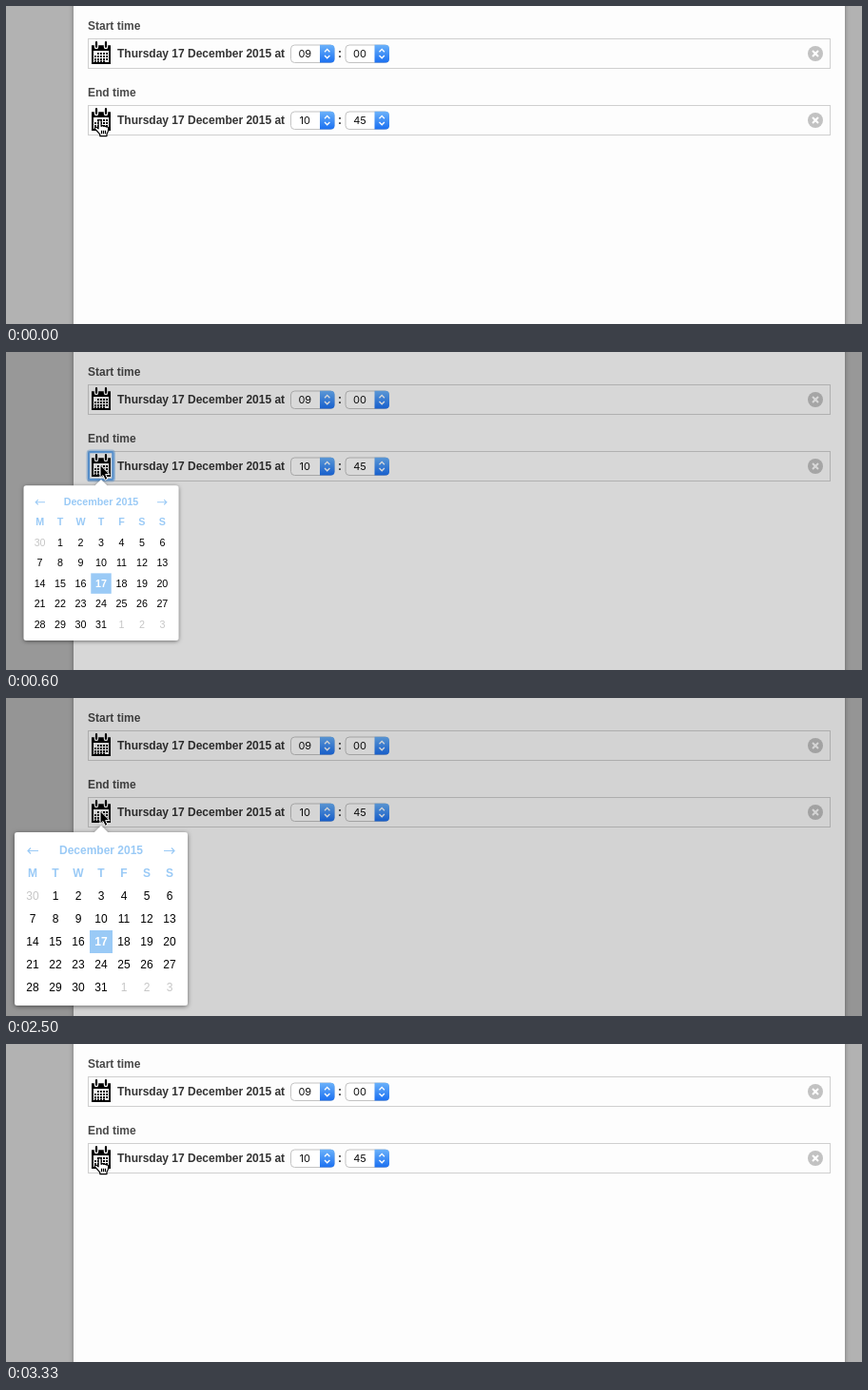
An HTML page for the animation above (4.01 s loop, 900 px wide and 334 px high).

```html
<!DOCTYPE html>
<html lang="en">
<head>
<meta charset="utf-8">
<title>Date picker</title>
<style>
  html, body { margin: 0; width: 100%; height: 100%; overflow: hidden; background: #b2b2b2; }
  svg { display: block; width: 900px; height: 334px; }
  text { font: 12px "Liberation Sans", Arial, sans-serif; }
  .bold { font-weight: bold; }
  .label { fill: #484848; }
  .value { fill: #333; }
  .option { font: 11px Inter, sans-serif; fill: #111; }
  .mid { text-anchor: middle; }
  .accent { fill: #9acaf6; }
  .muted { fill: #c6c6c6; }
</style>
</head>
<body>
<svg viewBox="0 0 900 334" xmlns="http://www.w3.org/2000/svg">
  <defs>
    <linearGradient id="blue" x2="0" y2="1">
      <stop stop-color="#6bb2fa"/><stop offset="1" stop-color="#1b70f1"/>
    </linearGradient>
    <filter id="panelShadow" x="-5%" y="-10%" width="110%" height="120%">
      <feDropShadow dx="0" dy="0" stdDeviation="2.5" flood-opacity=".35"/>
    </filter>
    <filter id="popupShadow" x="-10%" y="-10%" width="120%" height="120%">
      <feDropShadow dx="0" dy="1" stdDeviation="2.5" flood-opacity=".5"/>
    </filter>
    <g id="calendar">
      <path d="M91 42.5H109V60H91Z" fill="#fff" stroke="#000" stroke-width="2"/>
      <path d="M90 41.5H110V47H90Z"/>
      <path d="M95 39V43M105 39V43" stroke="#fff" stroke-width="4.4" stroke-linecap="round"/>
      <path d="M95 38.2V42.8M105 38.2V42.8" stroke="#000" stroke-width="2.2" stroke-linecap="round"/>
      <path d="M96 50H108M93 53H108M93 56H108M93 58.5H105" stroke="#000" stroke-width="2" stroke-dasharray="2 1"/>
    </g>
    <g id="select">
      <rect x="299.5" y="41" width="45.5" height="18.5" rx="4" fill="#fff" stroke="#c3c3c3"/>
      <path d="M330 40.7H341.5a4 4 0 0 1 4 4V55.5a4 4 0 0 1-4 4H330Z" fill="url(#blue)"/>
      <path d="M335 48.2L337.7 45.4L340.4 48.2M335 52L337.7 54.8L340.4 52" fill="none" stroke="#fff" stroke-width="1.3"/>
    </g>
    <g id="field">
      <rect x="86.5" y="34.5" width="780" height="31" fill="none" stroke="#cfcfcf"/>
      <use href="#select"/>
      <use href="#select" x="57.5"/>
      <circle cx="851" cy="50" r="8" fill="#c2c2c2"/>
      <path d="M848 47L854 53M854 47L848 53" stroke="#fff" stroke-width="2"/>
    </g>
  </defs>

  <rect width="900" height="334" fill="#b2b2b2"/>
  <rect x="71" y="-20" width="811" height="374" fill="#fdfdfd" filter="url(#panelShadow)"/>
  <g id="fields"></g>
  <g id="ring" fill="none" stroke="#4e9bec">
    <rect x="86.5" y="104.5" width="26.5" height="30" rx="2" stroke-width="4" opacity=".4"/>
    <rect x="87" y="105" width="25.5" height="29" rx="1.5" stroke-width="2" opacity=".75"/>
  </g>
  <use href="#calendar"/>
  <use href="#calendar" y="70"/>
  <rect id="shade" width="900" height="334"/>

  <g id="popup">
    <path d="M12 141H93L100 134L107 141H188a3 3 0 0 1 3 3V320a3 3 0 0 1-3 3H12a3 3 0 0 1-3-3V144a3 3 0 0 1 3-3Z" fill="#fff" filter="url(#popupShadow)"/>
    <path d="M34 160.5H23M26 157.5L23 160.5L26 163.5M166 160.5H177M174 157.5L177 160.5L174 163.5" fill="none" stroke="#9acaf6" stroke-width="1.2"/>
    <rect x="88" y="244" width="24" height="24" fill="#9acaf6"/>
    <g id="days"></g>
  </g>

  <path id="hand" transform="translate(92.5 118.8)" fill="#fff" stroke="#000" stroke-width="1.2" stroke-linejoin="round"
    d="M4.6 10V2.3a1.5 1.5 0 0 1 3 0V7.5Q9 6 10.3 7.6Q11.8 6.8 12.8 8.2Q15 7.8 15.2 9.8Q15.2 13.5 13.5 15.5V17.8H6.3V16Q4 13 1 10.4Q.5 8.2 2.4 8.5ZM8 12V15.5M10 12V15.5M12 12V15.5"/>
  <path id="arrow" d="M99 118.5V132.3L102 129.5L104.2 134.4L106.8 133.2L104.7 128.6H109Z" fill="#000" stroke="#fff"/>
</svg>
<script>
const LOOP = 4010;
const PRESS = 270, OPEN = 466, BLUR = 2500, CLOSE = 2671, HAND_BACK = 2970;
const FADE = 220;

const el = id => document.getElementById(id);
const text = (x, y, cls, s) => `<text x="${x}" y="${y}" class="${cls}">${s}</text>`;

const field = (dy, label, hour, minute) => `<g transform="translate(0 ${dy})">
  <use href="#field"/>
  ${text(86, 25, "bold label", label)}
  ${text(117, 54, "bold value", "Thursday 17 December 2015 at")}
  ${text(349, 54, "bold value", ":")}
  ${text(314.3, 54, "option mid", hour)}
  ${text(372, 54, "option mid", minute)}
</g>`;
el("fields").innerHTML = field(0, "Start time", "09", "00") + field(70, "End time", "10", "45");

function dayCell(i) {
  const day = i === 0 ? 30 : i > 31 ? i - 31 : i;
  const style = i === 0 || i > 31 ? "muted" : i === 17 ? "bold" : "";
  const cell = text(28 + i % 7 * 24, 212 + Math.floor(i / 7) * 24, "mid " + style, day);
  return i === 17 ? `<g fill="#fff">${cell}</g>` : cell;
}
el("days").innerHTML = text(100, 164, "bold mid accent", "December 2015") +
  [..."MTWTFSS"].map((d, i) => text(28 + i * 24, 188, "bold mid accent", d)).join("") +
  Array.from({ length: 35 }, (_, i) => dayCell(i)).join("");

// CSS "ease": cubic-bezier(.25, .1, .25, 1)
function ease(x) {
  if (x <= 0) return 0;
  if (x >= 1) return 1;
  let lo = 0, hi = 1;
  for (let i = 0; i < 24; i++) {
    const s = (lo + hi) / 2;
    if (.75 * s * (1 - s) + s ** 3 < x) lo = s; else hi = s;
  }
  return .3 * lo * (1 - lo) ** 2 + 3 * lo * lo * (1 - lo) + lo ** 3;
}

const show = (id, on) => el(id).setAttribute("display", on ? "inline" : "none");

function render(t) {
  const p = t < CLOSE ? ease((t - OPEN) / FADE) : ease(1 - (t - CLOSE) / FADE);
  const handOn = t < OPEN - 30 || t >= HAND_BACK;
  show("ring", t >= PRESS && t < BLUR);
  show("popup", p > .005);
  show("hand", handOn);
  show("arrow", !handOn);
  el("popup").setAttribute("transform", `translate(100 134) scale(${p}) translate(-100 -134)`);
  el("shade").setAttribute("opacity", .166 * p);
}

const start = performance.now();
function tick() {
  render((performance.now() - start) % LOOP);
  requestAnimationFrame(tick);
}
tick();
</script>
</body>
</html>
```
